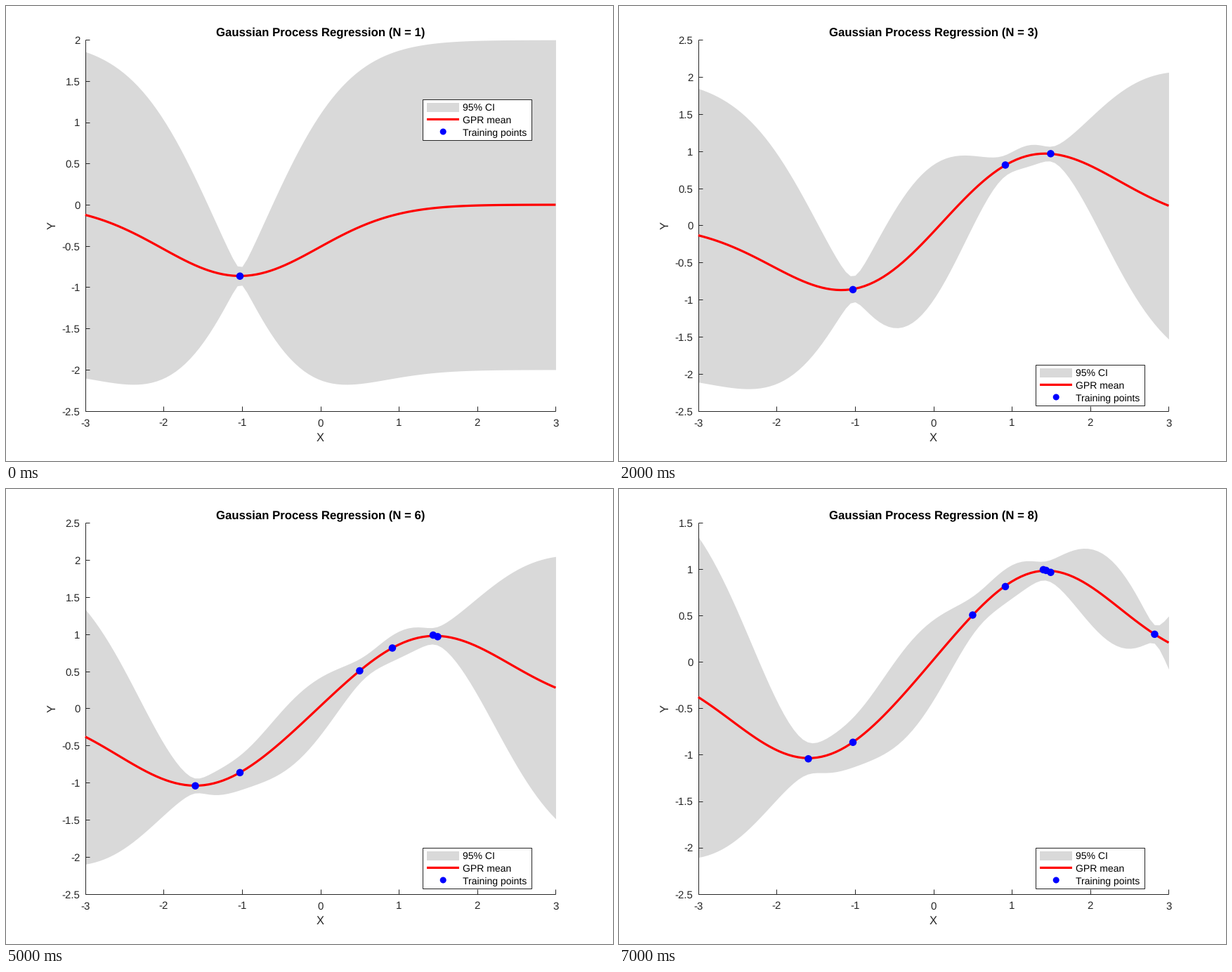
Write a matplotlib script that moves like this. It is 864 px wide and 648 px high and loops after 8000 ms.

```python
import numpy as np
import matplotlib.pyplot as plt
from matplotlib.animation import FuncAnimation
from matplotlib.patches import Circle, Rectangle

W, H = 864, 648
LEFT, RIGHT, TOP, BOTTOM = 112.8, 782.4, 48.2, 576.6
INK, BAND = "#262626", "#d9d9d9"

# Training points in the order they arrive
PX = np.array([-1.027, 0.917, 1.495, 0.500, 1.437, -1.596, 1.401, 2.821])
PY = np.array([-0.866, 0.813, 0.966, 0.506, 0.987, -1.044, 0.995, 0.299])
GRID = np.linspace(-3, 3, 100)
NOISE = 0.05 ** 2

plt.rcParams["font.family"] = "Liberation Sans"
plt.rcParams["text.hinting"] = "none"
fig = plt.figure(figsize=(W / 72, H / 72), dpi=72, facecolor="white")
ax = fig.add_axes([0, 0, 1, 1])


def kernel(a, b):
    return np.exp(-0.5 * (a[:, None] - b[None, :]) ** 2)


def posterior(n):
    """Mean and standard deviation; older points count as noisier."""
    x, y = PX[:n], PY[:n]
    cov = kernel(x, x) + np.diag(NOISE * np.arange(n, 0, -1))
    cross = kernel(GRID, x)
    gain = np.linalg.solve(cov, cross.T).T
    var = 1 - np.sum(gain * cross, axis=1)
    return gain @ y, np.sqrt(np.maximum(var, 0))


def to_x(x):
    return LEFT + (np.asarray(x) + 3) / 6 * (RIGHT - LEFT)


def text(x, y, s, size=15, color=INK, ha="center", **kw):
    ax.text(x, y, s, fontsize=size, color=color, ha=ha, va="baseline", **kw)


def line(xs, ys):
    ax.plot(xs, ys, color=INK, lw=1, zorder=5, solid_capstyle="butt")


def curve(xs, ys, z):
    ax.plot(xs, ys, color="red", lw=3.2, zorder=z, solid_capstyle="butt",
            snap=False)


def dot(x, y, size, z):
    ax.add_patch(Circle((x, y), size / 2, fc="blue", lw=0, zorder=z))


def draw_axes(lo, hi, to_y):
    line([LEFT, LEFT], [TOP, BOTTOM])
    line([LEFT, RIGHT], [BOTTOM, BOTTOM])
    for v in range(-3, 4):
        x = to_x(v)
        line([x, x], [BOTTOM, BOTTOM - 6.5])
        text(x, 598.5, str(v))
    for v in np.arange(lo, hi + 0.1, 0.5):
        y = to_y(v)
        line([LEFT, LEFT + 6.5], [y, y])
        text(105.5, y + 5.8, f"{v:g}", ha="right")
    text(447.3, 620, "X", 16.5)
    text(70.5, 313, "Y", 16.5, rotation=90, rotation_mode="anchor")


def draw_legend(x, y):
    ax.add_patch(Rectangle((x, y), 155, 58, fc="white", ec=INK, lw=1, zorder=8))
    ax.add_patch(Rectangle((x + 6, y + 5), 46, 12.5, fc=BAND, lw=0, zorder=9))
    curve([x + 6, x + 52], [y + 28.4, y + 28.4], 9)
    dot(x + 29.2, y + 46, 9, 9)
    for i, s in enumerate(("95% CI", "GPR mean", "Training points")):
        text(x + 56.5, y + 16.2 + 17.8 * i, s, 14, "black", "left", zorder=9)


def draw(i):
    n = i + 1
    ax.clear()
    ax.set_xlim(0, W)
    ax.set_ylim(H, 0)
    ax.axis("off")

    mean, sd = posterior(n)
    upper, lower = mean + 2 * sd, mean - 2 * sd
    hi, lo = np.ceil(2 * upper.max()) / 2, np.floor(2 * lower.min()) / 2

    def to_y(v):
        return BOTTOM - (v - lo) / (hi - lo) * (BOTTOM - TOP)

    gx = to_x(GRID)
    ax.fill_between(gx, to_y(lower), to_y(upper), color=BAND, lw=0, zorder=1)
    draw_axes(lo, hi, to_y)
    curve(gx, to_y(mean), 6)
    for x, y in zip(to_x(PX[:n]), to_y(PY[:n])):
        dot(x, y, 10.5, 7)
    text(447.3, 42.5, f"Gaussian Process Regression (N = {n})", 16.8, "black",
         weight="bold")
    draw_legend(*{1: (593, 133), 2: (370, 58)}.get(n, (593, 511)))
    return []


anim = FuncAnimation(fig, draw, frames=len(PX), interval=1000, repeat=True,
                     repeat_delay=0, init_func=lambda: draw(0))
plt.show()
```
